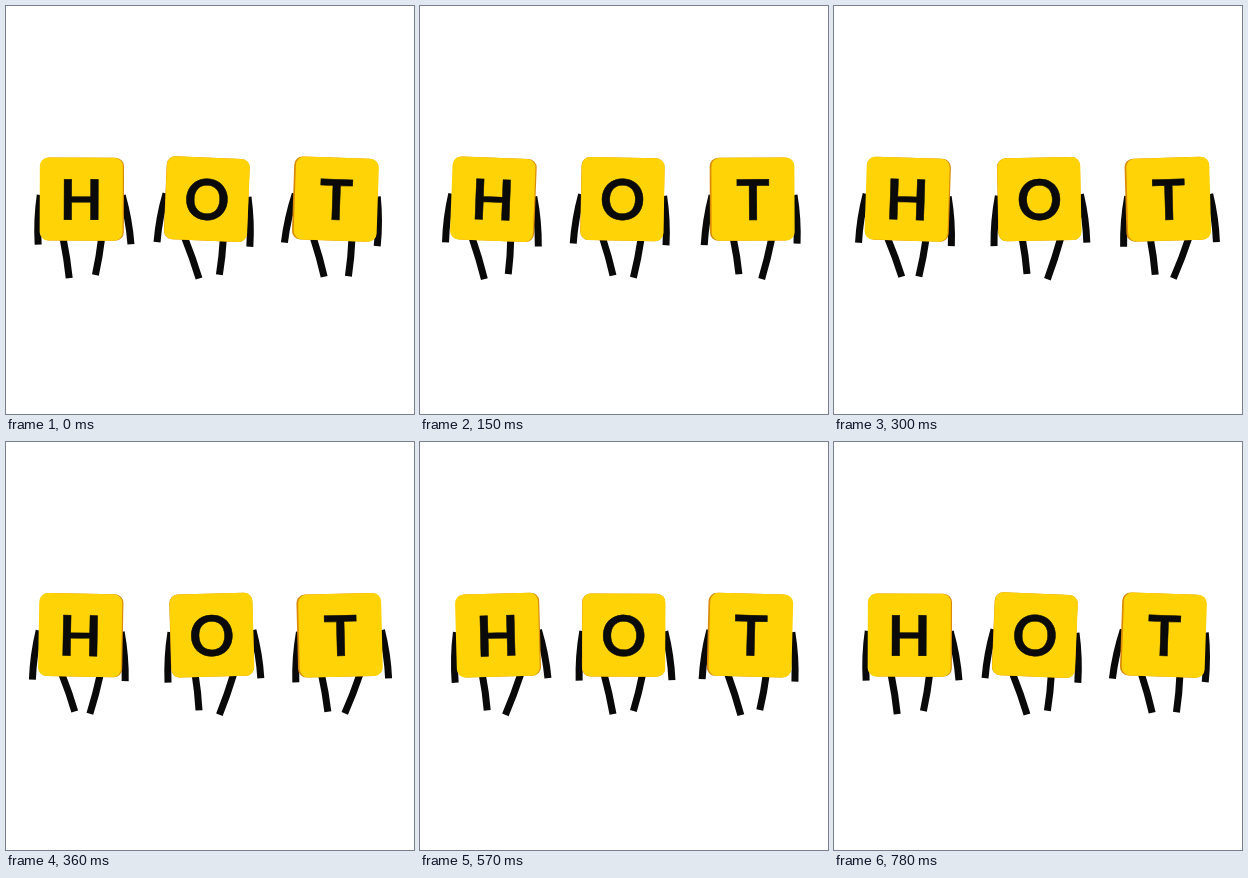
An HTML page for the animation above (810 ms loop, 408 by 408 pixels).

```html
<!DOCTYPE html>
<html lang="en">
<head>
<meta charset="utf-8">
<title>HOT</title>
<style>
  html, body { margin: 0; width: 100%; height: 100%; overflow: hidden; background: #fff; }
  svg { display: block; width: 100%; height: 100%; }
  path { fill: none; stroke: #090909; stroke-width: 7; }
  text { font: 700 56px Lato, "Open Sans", sans-serif; text-anchor: middle; fill: #0a0a0a; stroke: #0a0a0a; stroke-width: .5; }
  .side { fill: #d98a08; }
  .face { fill: #ffd306; }
</style>
</head>
<body>
<svg id="stage" viewBox="0 0 408 408"></svg>
<script>
const LOOP = 810, STEP = 30;
const SIZE = 83, HALF = SIZE / 2, MID_Y = 193.2;

// delay: how late in the turn (degrees) a dancer sways furthest right
// shuffle: how far the feet slide apart and together
const dancers = [
  { letter: 'H', x: 75, delay: 276, shuffle: 3 },
  { letter: 'O', x: 203.5, delay: 180, shuffle: 0 },
  { letter: 'T', x: 332.2, delay: 140, shuffle: 2 }
];

const stage = document.getElementById('stage');
const wave = deg => Math.cos(deg * Math.PI / 180);

function add(parent, tag, attrs = {}) {
  const el = document.createElementNS('http://www.w3.org/2000/svg', tag);
  for (const key in attrs) el.setAttribute(key, attrs[key]);
  return parent.appendChild(el);
}

function addBox(parent, name, dx) {
  add(parent, 'rect', { class: name, x: dx - HALF, y: -HALF, width: SIZE, height: SIZE, rx: 8.5 });
}

for (const d of dancers) {
  d.view = (180 - d.x) / 80; // perspective shift towards the middle
  d.arms = [add(stage, 'path'), add(stage, 'path')];
  d.legs = [add(stage, 'path'), add(stage, 'path')];
  d.body = add(stage, 'g');
  addBox(d.body, 'side', d.view * .9);
  addBox(d.body, 'face', 0);
  add(d.body, 'text', { y: 20.6 }).textContent = d.letter;
}

function limb(el, x1, y1, x2, y2, bend) {
  el.setAttribute('d', `M${x1} ${y1}Q${(x1 + x2) / 2 + bend} ${(y1 + y2) / 2} ${x2} ${y2}`);
}

function draw(t) {
  const turn = 360 * t / (LOOP - STEP); // the last step repeats the first pose

  for (const d of dancers) {
    const swing = turn - d.delay;
    const sway = wave(swing);
    const x = d.x + 2.5 * sway;
    const tilt = .4 - 2 * sway;
    const home = d.x + d.view;
    d.body.setAttribute('transform', `translate(${x} ${MID_Y}) rotate(${tilt})`);

    [-1, 1].forEach((dir, i) => {
      const handX = home + dir * 46.4 + 6 * wave(swing - 16);
      const handY = 238.4 - dir * 2.3 * sway;
      limb(d.arms[i], x + dir * 41, MID_Y - 4 + dir * .7 * tilt, handX, handY, dir * 2.5);

      const hipX = home + dir * 19.3 + 5.2 * wave(swing + 6);
      const footX = home + dir * (10.2 + d.shuffle * wave(turn - 15));
      const footY = 270.6 + dir * 2.6 * wave(swing + 45);
      limb(d.legs[i], hipX, 232, footX, footY, 1);
    });
  }
}

function tick(now) {
  draw(Math.floor(now % LOOP / STEP) * STEP);
  requestAnimationFrame(tick);
}
draw(0);
requestAnimationFrame(tick);
</script>
</body>
</html>
```
